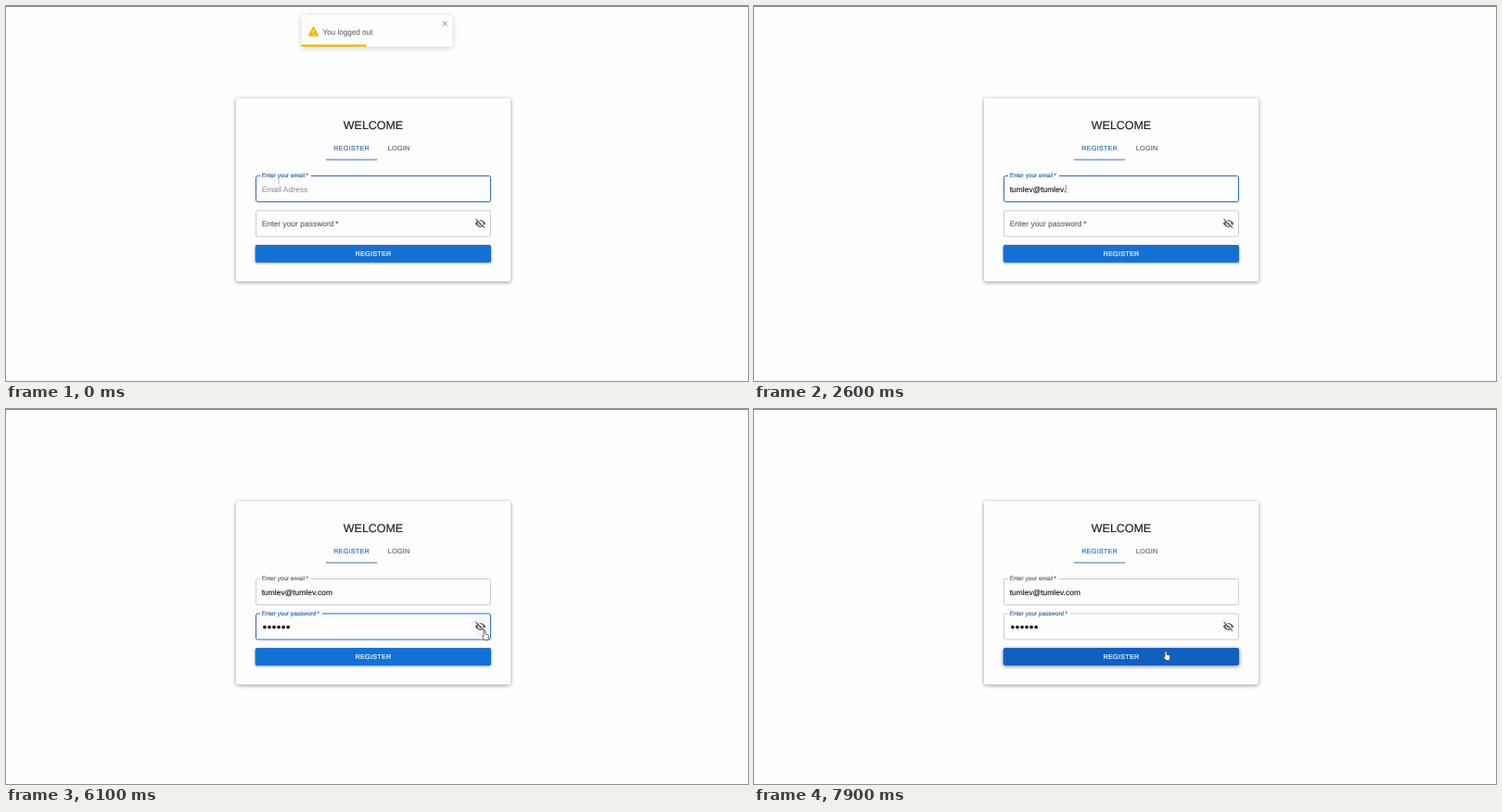
These frames come from a looping animation (800 px wide and 405 px high, 8 s). An HTML page with a canvas:

```html
<!DOCTYPE html>
<html lang="en">
<head>
<meta charset="utf-8">
<title>Register form</title>
<style>
  html, body { margin: 0; width: 100%; height: 100%; overflow: hidden; background: #fefdff; }
  canvas { display: block; }
</style>
</head>
<body>
<canvas id="stage" width="800" height="405"></canvas>
<script>
const ctx = document.getElementById('stage').getContext('2d');
const LOOP = 8000, STEP = 100;
const PAPER = '#fefdff', BLUE = [44, 106, 180], GREY = [104, 104, 108];

const EMAIL = 'tumlev@tumlev.com';
const EMAIL_KEYS = [400, 500, 600, 700, 800, 1000, 1500, 1700, 1900,
                    2000, 2100, 2200, 2400, 2600, 2800, 2900, 2900];
const PASSWORD_KEYS = [4100, 4200, 4400, 4500, 4700, 4800];
const TAB_PRESSED = 3050, BLURRED = 6900, TOAST_END = 2165;

// time, x, y
const POINTER = [
  [0, 294, 189], [4900, 300, 193], [5100, 360, 226], [5300, 500, 240], [5500, 576, 246],
  [5700, 581, 249], [5800, 581, 249], [6000, 520, 241], [6100, 515, 239], [6600, 515, 239],
  [6800, 455, 262], [6900, 450, 261], [7100, 468, 138], [7300, 456, 208.5],
  [7500, 454, 212], [7700, 448, 245], [7900, 443, 261], [8000, 443, 261]
];

const clamp = p => Math.max(0, Math.min(1, p));
const mix = (a, b, p) => a + (b - a) * p;
const smooth = p => p * p * (3 - 2 * p);
const progress = (t, start, length) => smooth(clamp((t - start) / length));
const between = (t, a, b) => t >= a && t < b;
const blend = (a, b, p) => `rgb(${a.map((v, i) => Math.round(mix(v, b[i], p)))})`;

// Piecewise path through [time, ...values] keys
function along(keys, t) {
  const i = Math.max(1, keys.findIndex(k => k[0] >= t));
  const [a, b] = [keys[i - 1], keys[i]];
  const p = smooth(clamp((t - a[0]) / (b[0] - a[0])));
  return a.slice(1).map((v, j) => mix(v, b[j + 1], p));
}

// The hairline stroke gives small type its slightly heavy look
function text(str, x, y, size, color, { align = 'left', spacing = 0 } = {}) {
  ctx.font = `${size}px "Liberation Sans", Arial, sans-serif`;
  ctx.textRendering = 'geometricPrecision';
  ctx.letterSpacing = `${spacing * size}px`;
  ctx.textAlign = align;
  ctx.fillStyle = ctx.strokeStyle = color;
  ctx.lineWidth = 0.18;
  ctx.fillText(str, x, y);
  ctx.strokeText(str, x, y);
  return ctx.measureText(str).width;
}

function box(x, y, w, h, r, { fill, stroke, shadow }) {
  ctx.save();
  ctx.beginPath();
  ctx.roundRect(x, y, w, h, r);
  if (shadow) [ctx.shadowColor, ctx.shadowBlur, ctx.shadowOffsetY] = shadow;
  if (fill) { ctx.fillStyle = fill; ctx.fill(); }
  if (stroke) { ctx.strokeStyle = stroke; ctx.lineWidth = 1; ctx.stroke(); }
  ctx.restore();
}

function line(color, width, ...points) {
  ctx.beginPath();
  points.forEach(([x, y]) => ctx.lineTo(x, y));
  ctx.strokeStyle = color;
  ctx.lineWidth = width;
  ctx.stroke();
}

function dot(x, y, r, color) {
  ctx.beginPath();
  ctx.arc(x, y, r, 0, 7);
  ctx.fillStyle = color;
  ctx.fill();
}

function toast(t) {
  const out = (t - TOAST_END) / 700;
  if (out > 0.6) return;
  const dy = out <= 0 ? 0 : along([[0, 0], [0.2, -5], [0.4, 10], [0.45, 10], [1, -1040]], out)[0];
  ctx.save();
  ctx.translate(0, dy);
  box(318.5, 10, 163, 34, 2, { fill: PAPER, shadow: ['rgba(0,0,0,.2)', 6, 1] });
  ctx.beginPath();
  ctx.moveTo(331.5, 23);
  ctx.lineTo(336.3, 32);
  ctx.lineTo(326.7, 32);
  ctx.closePath();
  ctx.fillStyle = ctx.strokeStyle = '#ecbb14';
  ctx.lineWidth = 1.6;
  ctx.lineJoin = 'round';
  ctx.fill();
  ctx.stroke();
  line('#fff', 1.1, [331.5, 25.5], [331.5, 29]);
  dot(331.5, 30.9, 0.65, '#fff');
  text('You logged out', 341.5, 30.7, 8.1, '#737376');
  line('#8a8a8a', 1, [470.8, 16.8], [475.6, 21.6]);
  line('#8a8a8a', 1, [475.6, 16.8], [470.8, 21.6]);
  ctx.fillStyle = '#f1bc10';
  ctx.fillRect(318.5, 41.6, 70 * clamp(1 - t / 2150), 2.4);
  ctx.restore();
}

function field(y, { label, gap, placeholder, focus, hover, shrink, tint = focus }) {
  const stroke = focus > 0.5 ? `rgb(${BLUE})` : hover ? '#6d6a72' : '#cbcbcf';
  box(269.5, y, 253, 28, 2, { stroke });
  if (shrink > 0) {
    ctx.fillStyle = PAPER;
    ctx.fillRect(274, y - 1, gap * shrink, 2);
  }
  const size = mix(8.33, 6.25, shrink);
  text(label + '\u2009*', 275.7, mix(y + 16.8, y + 1.8, shrink), size,
       blend(GREY, BLUE, tint), { spacing: 0.0094 });
  if (placeholder) {
    ctx.globalAlpha = shrink;
    text(placeholder, 275.7, y + 17, 8.33, '#9c9ca0', { spacing: 0.0094 });
    ctx.globalAlpha = 1;
  }
}

function eye() {
  ctx.save();
  ctx.translate(511.5, 235);
  ctx.beginPath();
  ctx.moveTo(-5.8, 0);
  ctx.quadraticCurveTo(0, -8, 5.8, 0);
  ctx.quadraticCurveTo(0, 8, -5.8, 0);
  ctx.fillStyle = '#636367';
  ctx.fill();
  dot(0, 0, 2.7, PAPER);
  dot(0, 0, 1.6, '#636367');
  line(PAPER, 1.2, [-4, -5.7], [5.3, 3.7]);
  line('#636367', 1.1, [-5, -5], [4.7, 4.8]);
  ctx.restore();
}

function pointer(x, y, kind, color) {
  ctx.save();
  ctx.translate(x, y);
  ctx.lineJoin = 'round';
  if (kind === 'beam') {
    line(color, 0.9, [0, -3.3], [0, 3.3]);
  } else {
    const path = new Path2D(kind === 'hand'
      ? 'M0 1Q1-.6 2 1V4L5 5Q6 5.4 5.6 7L4.8 10.5H1L-1.6 6.8Q-1.5 5.6 0 6.6Z'
      : 'M0 0V9L2.1 7.2 3.5 10.4 4.9 9.8 3.5 6.7H6.3Z');
    ctx.fillStyle = '#fff';
    ctx.strokeStyle = '#444';
    ctx.lineWidth = 0.8;
    ctx.fill(path);
    ctx.stroke(path);
  }
  ctx.restore();
}

function draw(t) {
  const [px, py] = along(POINTER, t);
  const inside = (x, y, w, h) => px > x && px < x + w && py > y && py < y + h;
  const hidden = between(t, 400, 4900);
  const onEmail = inside(269, 183, 254, 30), onPassword = inside(269, 220, 254, 30);
  const onEye = inside(501, 225, 22, 21), onButton = inside(269, 257, 254, 20);

  ctx.fillStyle = PAPER;
  ctx.fillRect(0, 0, 800, 405);
  ctx.fillStyle = '#85858a';
  ctx.fillRect(0, 0, 800, 1);
  toast(t);

  box(248, 99.5, 296, 198, 2, { fill: PAPER, shadow: ['rgba(0,0,0,.42)', 4, 1] });
  text('WELCOME', 396, 133, 12.45, '#222', { align: 'center' });
  const caps = { align: 'center', spacing: 0.0286 };
  text('REGISTER', 372.6, 156.2, 7.29, '#3a70b4', caps);
  text('LOGIN', 423.7, 156.2, 7.29, '#68686c', caps);
  ctx.fillStyle = '#3f70b5';
  ctx.fillRect(345, 165.5, 55, 1);

  const typed = EMAIL_KEYS.filter(k => k <= t).length;
  const dots = PASSWORD_KEYS.filter(k => k <= t).length;
  const tabbed = progress(t, TAB_PRESSED, 200);
  const active = tabbed * (1 - progress(t, BLURRED, 200));
  field(183.5, {
    label: 'Enter your email', gap: 55, placeholder: !typed && 'Email Adress',
    focus: 1 - tabbed, hover: onEmail, shrink: 1
  });
  field(221, {
    label: 'Enter your password', gap: 67,
    placeholder: t > TAB_PRESSED && !dots && 'Email Password',
    focus: active, hover: onPassword && !hidden, shrink: tabbed,
    tint: t >= 7600 ? 0.6 : active
  });

  const width = text(EMAIL.slice(0, typed), 275.7, 200.6, 8.33, '#222', { spacing: 0.0094 });
  if (typed && t < TAB_PRESSED) line('#333', 0.6, [275.9 + width, 193], [275.9 + width, 202]);
  for (let i = 0; i < dots; i++) dot(278.9 + 5.05 * i, 235.6, 1.9, '#1d1d1f');
  if (dots && t < 4900) line('#333', 0.6, [277 + 5.05 * dots, 231], [277 + 5.05 * dots, 240]);

  if (onEye) dot(511.5, 235, 10.4, 'rgba(0,0,0,.04)');
  eye();

  const dark = Math.max(progress(t, 6750, 200) * (1 - 0.55 * progress(t, 7050, 200)) *
                        (1 - progress(t, 7300, 200)), progress(t, 7650, 200));
  box(268.7, 258, 254.3, 19, 2, {
    fill: blend([20, 113, 212], [16, 96, 192], dark),
    shadow: [`rgba(0,0,0,${mix(0.4, 0.5, dark)})`, mix(2.5, 4, dark), 1]
  });
  text('REGISTER', 396, 270, 7.29, '#f4f8fd', caps);

  if (hidden) return;
  const kind = onButton || onEye ? 'hand' : onEmail || onPassword ? 'beam' : 'arrow';
  pointer(px, py, kind, t < 400 ? '#b5b5ba' : '#55555a');
}

let start;
function tick(now) {
  start ??= now;
  draw(Math.floor((now - start) / STEP) * STEP % LOOP);
  requestAnimationFrame(tick);
}
requestAnimationFrame(tick);
</script>
</body>
</html>
```
